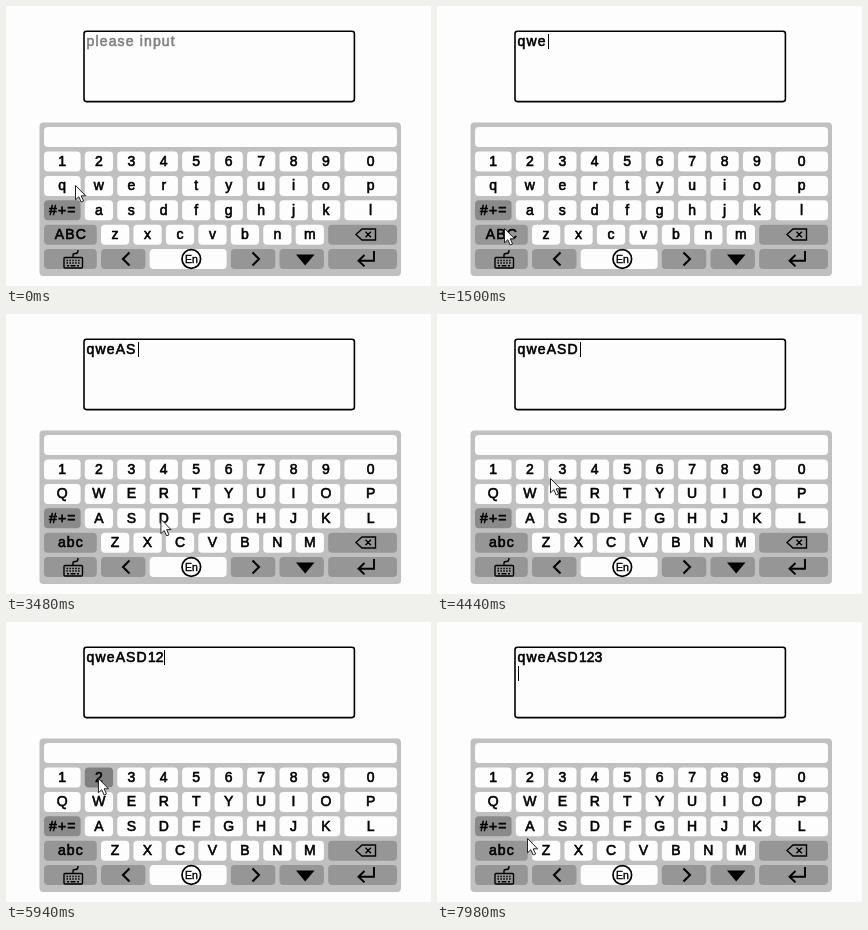
An HTML page for the animation above (8 s loop, 425 by 280 pixels).

```html
<!DOCTYPE html>
<html lang="en">
<head>
<meta charset="utf-8">
<title>On-screen keyboard</title>
<style>
html, body { margin: 0; width: 100%; height: 100%; overflow: hidden; background: #fdfdfd; }
svg { display: block; width: 425px; height: 280px; }
text { font: 14px "Liberation Sans", Arial, sans-serif; letter-spacing: 1.15px; stroke: #000; stroke-width: .6; white-space: pre; }
.label { text-anchor: middle; }
.line { fill: none; stroke: #000; }
#hint { fill: #808080; stroke: #808080; }
#digits { letter-spacing: 0; }
#lang { font-size: 10.5px; letter-spacing: 0; stroke-width: .4; }
</style>
</head>
<body>
<svg viewBox="0 0 425 280">
  <rect x="78" y="25.2" width="270.4" height="70.4" rx="2.5" fill="#fdfdfd" stroke="#000" stroke-width="1.6"/>
  <text id="hint" x="80.5" y="40">please input</text>
  <text id="typed" x="80.5" y="40"><tspan id="letters"></tspan><tspan id="digits"></tspan></text>
  <rect id="caret" width="1" height="15"/>
  <rect x="33.5" y="116.5" width="361.5" height="153.5" rx="4" fill="#c0c0c0"/>
  <rect x="38" y="121" width="353" height="20" rx="4" fill="#fdfdfd"/>
  <g id="keys"></g>
  <g class="line" stroke-width="1.4">
    <path d="M350 228.5L356 223H369.5V234H356ZM359.5 225.8l5.4 5.4m0-5.4l-5.4 5.4"/>
    <path d="M368 245V254.7H353M358.5 249L352.5 254.7L358.5 260.4" stroke-width="1.9"/>
    <path d="M123.5 246.5L117 253L123.5 259.5M246.5 246.5L253 253L246.5 259.5" stroke-width="2.1"/>
    <circle cx="185.3" cy="253" r="9.3" stroke-width="1.7"/>
    <rect x="58" y="251.5" width="18.5" height="10.5" rx="1"/>
    <path d="M67 251V249Q67 247.5 69 247.5H70Q72 247.5 72 244"/>
    <path d="M60.5 254.5H74M60.5 257H74" stroke-dasharray="1.5 1.4"/>
    <path d="M61 259.7h2m1.5 0h5m1.5 0h2"/>
  </g>
  <path d="M290 248.5H308.5L299.2 259.5Z"/>
  <text id="lang" class="label" x="185.3" y="256.8">En</text>
  <path id="pointer" d="M.5 .5V14.8L3.8 11.7L6.2 17L8.6 16L6.2 10.8H10.6Z" fill="#fff" stroke="#222"/>
</svg>
<script>
const $ = id => document.getElementById(id);
const LOOP = 8000, STEP = 60, HOLD = 120, SETTLE = 180, TRAVEL = 360;
const LEFT = 38, RIGHT = 391, GAP = 4.2, PITCH_X = 32.45, PITCH_Y = 24.4;
const PALE = "#fdfdfd", GREY = "#969696", DARK = "#808080";
const keys = {};

function add(tag, attrs) {
  const el = document.createElementNS("http://www.w3.org/2000/svg", tag);
  for (const k in attrs) el.setAttribute(k, attrs[k]);
  return $("keys").appendChild(el);
}

// The first key fills the space before start; the others sit on a column grid.
function addRow(row, names, start, column = i => i) {
  const edges = names.map((_, i) => i ? start + PITCH_X * column(i - 1) : LEFT);
  names.forEach((name, i) => {
    const x = edges[i], right = i + 1 < names.length ? edges[i + 1] - GAP : RIGHT;
    const y = 145.5 + row * PITCH_Y, cx = (x + right) / 2;
    const label = name === "sym" ? "#+=" : name.length > 1 ? "" : name;
    const fill = name === "sym" ? "#8a8a8a" : name.length > 1 && name !== "lang" ? GREY : PALE;
    const rect = add("rect", { x, y, width: right - x, height: 20, rx: 4, fill });
    const text = add("text", { class: "label", x: cx + .5, y: y + 14.3 });
    keys[name] = { rect, text, fill, label, spot: [cx - 1, y + 10.5] };
  });
}

addRow(0, [..."1234567890"], 78.8);
addRow(1, [..."qwertyuiop"], 78.8);
addRow(2, ["sym", ..."asdfghjkl"], 78.8);
addRow(3, ["shift", ..."zxcvbnm", "back"], 95);
addRow(4, ["hide", "left", "blank", "right", "down", "enter"], 95, i => [0, 1.5, 4, 5.5, 7][i]);
keys.blank.fill = PALE;

// Keys are pressed at the given time; points are only passed.
const script = [
  [[69, 179], 0], ["q", 60], ["w", 660], ["e", 1080], [[67, 222], 1500],
  ["shift", 1980], ["a", 2640], ["s", 3060], ["d", 3720], [[113, 164], 4440],
  ["1", 4800], [[110, 163], 5040], ["2", 5940], ["3", 6420],
  [[316, 186], 6720], [[400, 243], 7020], ["enter", 7500], [[90, 216], 7980]
];
const presses = script.filter(([where]) => keys[where]);
const stops = script.filter(([where]) => where !== "q").map(([where, time]) => keys[where]
  ? { spot: keys[where].spot, arrive: time - SETTLE, leave: time + HOLD }
  : { spot: where, arrive: time, leave: time });
stops[0].leave = presses[0][1] + HOLD;

function pointerAt(t) {
  const i = stops.findIndex(s => s.arrive > t);
  if (i < 0) return stops[stops.length - 1].spot;
  const from = stops[i - 1], to = stops[i];
  const depart = Math.max(from.leave, to.arrive - TRAVEL);
  const u = Math.max(0, (t - depart) / (to.arrive - depart));
  const ease = u * u * (3 - 2 * u);
  return from.spot.map((a, n) => a + (to.spot[n] - a) * ease);
}

function draw(time) {
  const t = Math.floor((time % LOOP) / STEP) * STEP;
  const done = presses.filter(([, down]) => down <= t);
  const active = done.length && t < done[done.length - 1][1] + HOLD ? done[done.length - 1][0] : "";
  let letters = "", digits = "", caps = false, newline = false;
  for (const [name] of done) {
    if (name === "shift") caps = true;
    else if (name === "enter") newline = true;
    else if (name < "a") digits += name;
    else letters += caps ? name.toUpperCase() : name;
  }
  for (const name in keys) {
    const { rect, text, fill, label } = keys[name];
    rect.setAttribute("fill", name === active ? DARK : fill);
    text.textContent = name === "shift" ? (caps ? "abc" : "ABC") : caps ? label.toUpperCase() : label;
  }
  $("letters").textContent = letters;
  $("digits").textContent = digits;
  $("hint").setAttribute("visibility", letters ? "hidden" : "visible");
  $("caret").setAttribute("visibility", letters ? "visible" : "hidden");
  $("caret").setAttribute("x", newline ? 81 : Math.floor(82 + $("typed").getComputedTextLength()));
  $("caret").setAttribute("y", newline ? 44 : 28);
  $("pointer").setAttribute("transform", `translate(${pointerAt(t)})`);
}

const start = performance.now();
function tick() {
  draw(performance.now() - start);
  requestAnimationFrame(tick);
}
tick();
</script>
</body>
</html>
```
